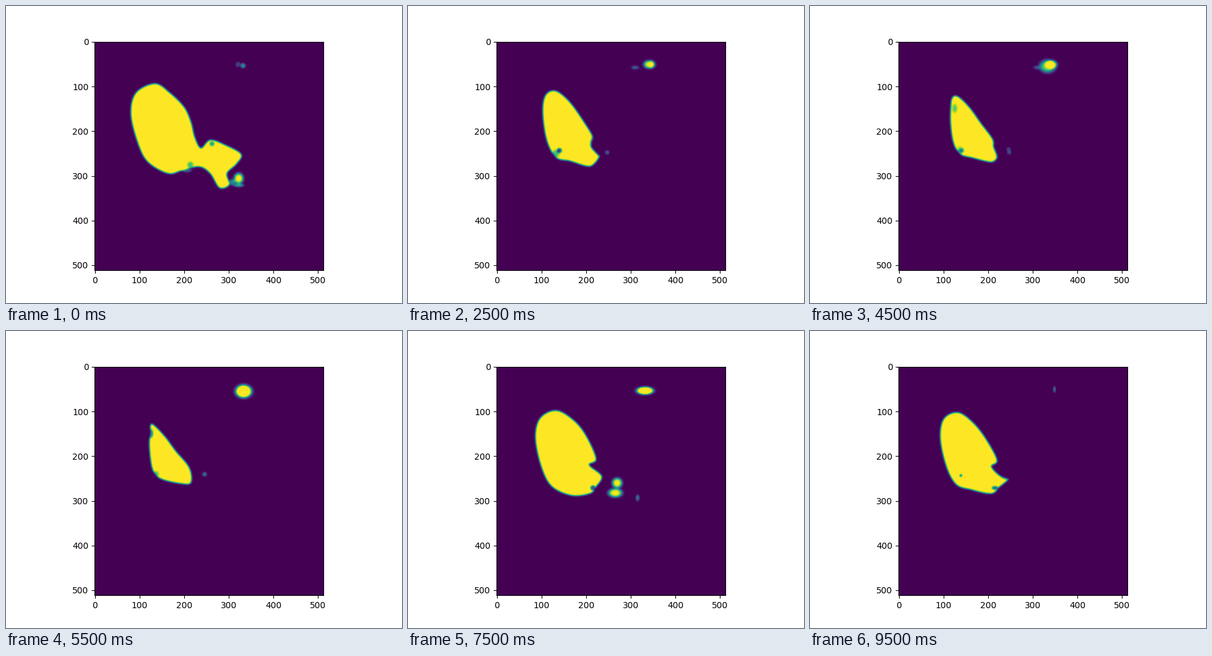
Animation of 640x480 px, one loop 10 s. Source, as a matplotlib script:

```python
import matplotlib.pyplot as plt
import numpy as np
from matplotlib.animation import FuncAnimation
from matplotlib.path import Path

SIZE = 512                             # image side in data units
LEFT, TOP, SIDE = 143.2, 57.6, 369.6   # axes box in stage pixels
GRID = 256
SOFT = 4.6                             # edge width in stage pixels

steps = (np.arange(GRID) + 0.5) * SIDE / GRID
X, Y = np.meshgrid(LEFT + steps, TOP + steps)


def smooth(points, cuts=6):
    """Closed Catmull-Rom curve through the points."""
    p1 = np.array(points, float)
    p0, p2, p3 = (np.roll(p1, k, axis=0) for k in (1, -1, -2))
    curve = [
        p1 + 0.5 * ((p2 - p0) * t + (2 * p0 - 5 * p1 + 4 * p2 - p3) * t ** 2
                    + (3 * p1 - p0 - 3 * p2 + p3) * t ** 3)
        for t in np.arange(cuts) / cuts
    ]
    return np.stack(curve, axis=1).reshape(-1, 2)


def outline(*points):
    """Signed distance to a smooth closed outline, positive inside."""
    curve = smooth(points)
    best = np.full(X.shape, np.inf)
    for (ax, ay), (bx, by) in zip(curve, np.roll(curve, -1, axis=0)):
        dx, dy = bx - ax, by - ay
        px, py = X - ax, Y - ay
        t = np.clip((px * dx + py * dy) / (dx * dx + dy * dy), 0, 1)
        best = np.minimum(best, (px - t * dx) ** 2 + (py - t * dy) ** 2)
    closed = Path(np.vstack([curve, curve[:1]]))
    inside = closed.contains_points(np.column_stack([X.ravel(), Y.ravel()]))
    return np.sqrt(best) * np.where(inside.reshape(X.shape), 1, -1)


def mark(strength, x, y, rx, ry=None):
    """Flat-topped soft ellipse; a negative strength darkens."""
    r2 = ((X - x) / rx) ** 2 + ((Y - y) / (ry or rx)) ** 2
    return strength * np.exp(-r2 ** 2)


# Key slices by depth, in stage pixels.
bodies = {
    0: outline((241, 126), (265, 141), (288, 164), (299, 188), (305, 212),
               (315, 230), (330, 217), (354, 225), (380, 240), (372, 256),
               (357, 271), (361, 289), (345, 294), (330, 271), (312, 260),
               (285, 266), (262, 271), (230, 253), (214, 224), (202, 176),
               (210, 141)),
    5: outline((240, 129), (268, 145), (288, 170), (304, 207), (293, 217),
               (313, 235), (304, 252), (294, 263), (264, 266), (232, 251),
               (215, 218), (206, 172), (214, 141)),
    10: outline((239, 133), (262, 149), (284, 177), (302, 210), (293, 220),
                (307, 236), (322, 240), (306, 253), (293, 263), (262, 255),
                (238, 248), (222, 220), (212, 175), (217, 143)),
    15: outline((238, 141), (258, 157), (280, 188), (297, 215), (295, 229),
                (305, 245), (293, 257), (262, 248), (240, 243), (226, 215),
                (222, 170), (226, 146)),
    19: outline((236, 151), (256, 170), (274, 194), (296, 221), (299, 245),
                (283, 247), (250, 239), (237, 224), (232, 190), (233, 166)),
}
marks = {
    0: mark(1, 376, 279, 7.5, 8.5) + mark(0.5, 376, 290, 8, 3)
       + mark(0.45, 366, 285, 5) + mark(0.3, 292, 266, 8, 3)
       + mark(-0.4, 333, 223, 4) + mark(-0.3, 298, 257, 5)
       + mark(0.45, 383, 97, 4) + mark(0.2, 375, 95, 4),
    5: mark(1, 338, 246, 8) + mark(1, 335, 262, 11, 7)
       + mark(1.6, 383, 97, 13, 6) + mark(-0.7, 299, 254, 4)
       + mark(0.35, 371, 270, 3, 5),
    9: mark(-0.6, 299, 254, 5, 3) + mark(-0.4, 244, 234, 2.5)
       + mark(0.35, 395, 95, 2, 5),
    10: mark(-0.75, 244, 234, 3.5) + mark(0.55, 394, 95, 4, 6),
    15: mark(-0.85, 245, 234, 4) + mark(-0.5, 239, 239, 6)
        + mark(1.6, 390, 95, 9, 6.5) + mark(0.45, 367, 100, 6, 3)
        + mark(0.4, 322, 237, 3.5),
    19: mark(-0.5, 234, 166, 4, 7) + mark(-0.3, 242, 232, 5)
        + mark(1.6, 384, 98, 12.5, 10) + mark(0.35, 321, 232, 3.5),
}
ORDER = sorted(range(20), key=str)   # slices play in name order: 0, 1, 10, 11 ...


def between(keys, z):
    low = max(k for k in keys if k <= z)
    high = min(k for k in keys if k >= z)
    t = (z - low) / max(high - low, 1)
    return (1 - t) * keys[low] + t * keys[high]


def scan(z):
    body = np.clip(0.5 + between(bodies, z) / SOFT, 0, 1)
    body = body * body * (3 - 2 * body)
    return np.clip(body + between(marks, z), 0, 1)


fig, ax = plt.subplots(figsize=(6.4, 4.8), dpi=100)
image = ax.imshow(scan(0), cmap="viridis", vmin=0, vmax=1, interpolation="bilinear",
                  extent=(-0.5, SIZE - 0.5, SIZE - 0.5, -0.5))


def update(i):
    image.set_data(scan(ORDER[i]))
    return [image]


anim = FuncAnimation(fig, update, frames=len(ORDER), interval=500,
                     repeat=True, repeat_delay=0)
plt.show()
```
